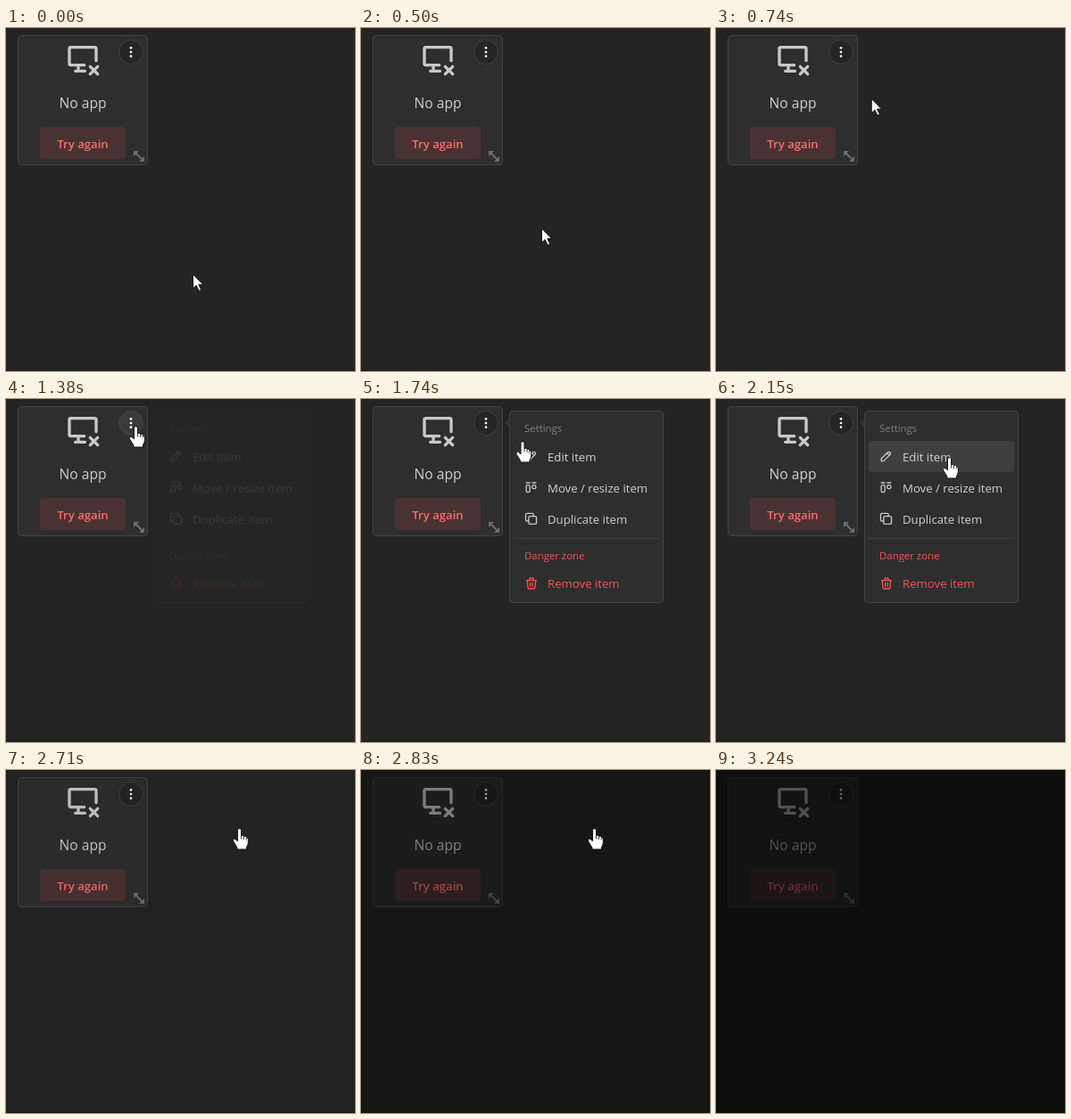
Animation, 391 px wide and 385 px high, one loop 3520 ms. Source, as an HTML page:

```html
<!DOCTYPE html>
<html lang="en">
<head>
<meta charset="utf-8">
<title>Board item menu</title>
<style>
  html, body { margin: 0; width: 100%; height: 100%; overflow: hidden; background: #242424; }
  svg { display: block; }
  text { font-family: "Open Sans", "Noto Sans", sans-serif; font-size: 13.2px; fill: #d0d0d0; }
  .box { fill: #2e2e2e; stroke: #424242; }
  .icon { fill: none; stroke: #c9c9c9; stroke-width: 2; stroke-linecap: round; stroke-linejoin: round; }
  .small { font-size: 11.4px; }
  .red { fill: #fa5252; }
  .icon.red { fill: none; stroke: #fa5252; }
  .cursor { fill: #fff; stroke: #111; stroke-linejoin: round; }
</style>
</head>
<body>
<svg width="391" height="385" viewBox="0 0 391 385">
  <rect width="391" height="385" fill="#242424"/>
  <rect y="384" width="391" height="1" fill="#1d1819"/>

  <!-- card -->
  <rect class="box" x="13.5" y="8.5" width="145" height="145" rx="3.5"/>
  <path class="icon" transform="translate(66 15) scale(1.667)"
    d="M13 16H4a1 1 0 0 1-1-1V5a1 1 0 0 1 1-1h16a1 1 0 0 1 1 1v8M7 20h6.500M9 16v4M22 22l-5-5M17 22l5-5"/>
  <text x="86" y="90.4" text-anchor="middle" style="font-size:15.6px">No app</text>
  <rect x="38" y="111" width="96" height="36" rx="4" fill="#4a3232"/>
  <text x="86" y="135" text-anchor="middle" style="font-size:13.1px;font-weight:600;fill:#ff6b6b">Try again</text>
  <g fill="#6e6e6e">
    <path d="M143 138h6l-6 6zM155 150h-6l6-6z"/>
    <path d="M145 140l8 8" stroke="#6e6e6e" stroke-width="2"/>
  </g>
  <circle id="dots" cx="140" cy="27" r="13.5" stroke="#424242"/>
  <g fill="#fff">
    <circle cx="140" cy="22.3" r="1.35"/>
    <circle cx="140" cy="27" r="1.35"/>
    <circle cx="140" cy="31.7" r="1.35"/>
  </g>

  <g id="menu">
    <rect class="box" x="166.5" y="13.5" width="172" height="215" rx="3.5"/>
    <path class="box" d="M166.5 23l-4 4 4 4"/>
    <rect id="hover" x="171" y="47" width="163" height="35" rx="4" fill="#3f3f3f"/>
    <path d="M171 156.5h163" stroke="#424242"/>
    <text class="small" x="183" y="37" style="fill:#828282">Settings</text>
    <text class="small red" x="183" y="180">Danger zone</text>
    <text x="209" y="70">Edit item</text>
    <text x="209" y="105">Move / resize item</text>
    <text x="209" y="140">Duplicate item</text>
    <text class="red" x="209" y="212">Remove item</text>
    <path class="icon" transform="translate(182.500 56.300) scale(.667)"
      d="M4 20h4L18.500 9.500a2.830 2.830 0 1 0-4-4L4 16v4M13.500 6.500l4 4"/>
    <path class="icon" transform="translate(182.500 91.300) scale(.667)"
      d="M4 4h6M14 4h6M4 10a2 2 0 0 1 2-2h2a2 2 0 0 1 2 2v8a2 2 0 0 1-2 2H6a2 2 0 0 1-2-2zM14 10a2 2 0 0 1 2-2h2a2 2 0 0 1 2 2v2a2 2 0 0 1-2 2h-2a2 2 0 0 1-2-2z"/>
    <path class="icon" transform="translate(182.500 126.300) scale(.667)"
      d="M10 8h9a2 2 0 0 1 2 2v9a2 2 0 0 1-2 2h-9a2 2 0 0 1-2-2v-9a2 2 0 0 1 2-2zM16 8V5a2 2 0 0 0-2-2H5a2 2 0 0 0-2 2v9a2 2 0 0 0 2 2h3"/>
    <path class="icon red" transform="translate(183 199) scale(.667)"
      d="M4 7h16M10 11v6M14 11v6M5 7l1 12a2 2 0 0 0 2 2h8a2 2 0 0 0 2-2l1-12M9 7V4a1 1 0 0 1 1-1h4a1 1 0 0 1 1 1v3"/>
  </g>

  <rect id="shade" width="391" height="385"/>

  <path id="arrow" class="cursor" d="M.5.5v16l3.7-3.5 2.9 6.2 2.6-1.2-2.8-6h4.9z"/>
  <g id="hand" class="cursor">
    <path d="M-2 2.2a2 2 0 0 1 4 0V8q2.500-1 3 .9 2.200-.6 2.700 1.100 2.100 0 2.100 2.300V16q0 2.800-1.800 5v2.500H-2.600V21.500l-4-6.500q-1.300-2.700.8-3.100 1.500 0 3.800 2.400z"/>
    <path d="M2 8v4M5 9v3.500M7.700 10.500v2.500" stroke-width=".8"/>
  </g>
</svg>
<script>
  const LOOP = 3520;
  const $ = id => document.getElementById(id);
  const [dots, menu, hover, shade, arrow, hand] =
    ["dots", "menu", "hover", "shade", "arrow", "hand"].map($);

  // Cursor moves; bx and by bend the path by easing each axis with its own power.
  const home = { x: 209, y: 276 };
  const moves = [
    { first: 500, step: 80, from: 440, to: 980, x: 145.5, y: 30.5, bx: 1, by: 2 },
    { first: 1680, step: 60, from: 1620, to: 2100, x: 261.5, y: 65.5, bx: 1.27, by: 2.3 },
    { first: 2910, step: 60, from: 2910, to: 3180, x: 333, y: 379, bx: 1, by: 1 }
  ];

  const clamp = v => Math.min(1, Math.max(0, v));
  const smooth = p => p * p * (3 - 2 * p);
  const easeOut = (p, power) => 1 - (1 - p) ** power;
  const within = (t, a, b) => t >= a && t < b;
  const show = (el, on) => el.setAttribute("visibility", on ? "visible" : "hidden");

  // Progress that holds still between steps.
  function stepped(t, first, step, from, to) {
    if (t < first) return 0;
    const held = first + Math.floor((t - first) / step) * step;
    return clamp((held - from) / (to - from));
  }

  function cursorAt(t) {
    let { x, y } = home;
    for (const m of moves) {
      const p = stepped(t, m.first, m.step, m.from, m.to);
      x += (m.x - x) * easeOut(p, m.bx);
      y += (m.y - y) * easeOut(p, m.by);
    }
    return `translate(${x} ${y})`;
  }

  function draw(t) {
    const pointing = within(t, 1040, 2840);
    show(hand, pointing);
    show(arrow, !pointing && t < 3240);
    (pointing ? hand : arrow).setAttribute("transform", cursorAt(t));
    dots.setAttribute("fill", within(t, 1290, 1680) ? "#3b3b3b" : "#252525");
    menu.setAttribute("opacity", t < 2710 ? smooth(stepped(t, 1380, 60, 1350, 1500)) : 0);
    show(hover, within(t, 1800, 2710));
    shade.setAttribute("opacity", .6 * smooth(stepped(t, 2710, 60, 2650, 2950)));
  }

  const start = performance.now();
  function tick() {
    draw((performance.now() - start) % LOOP);
    requestAnimationFrame(tick);
  }
  tick();
</script>
</body>
</html>
```
